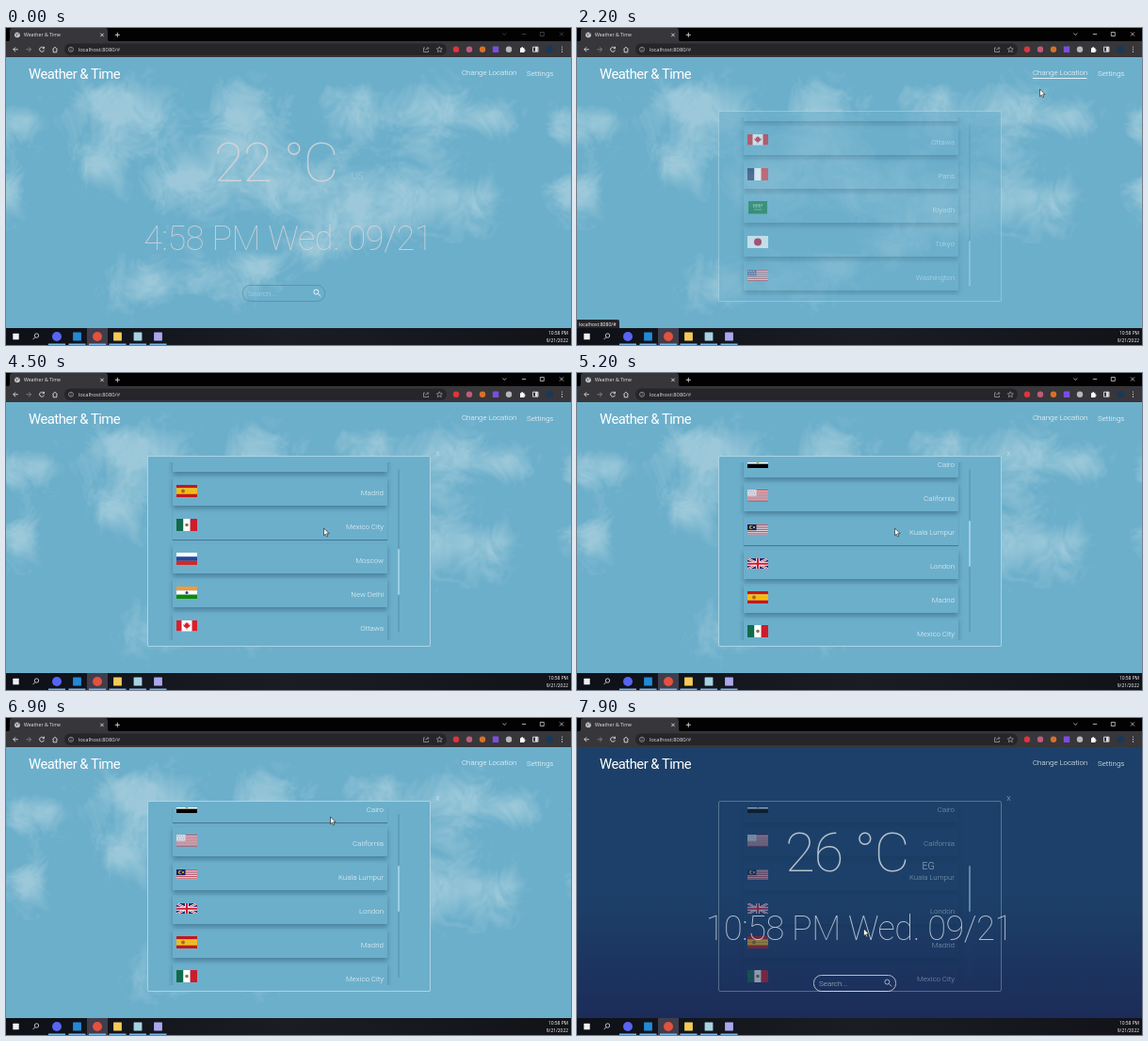
An HTML page with a canvas that plays this animation: 600x337 px, repeating every 8 s.

```html
<!DOCTYPE html>
<html lang="en">
<head>
<meta charset="utf-8">
<title>Weather &amp; Time</title>
<style>
html, body { margin: 0; width: 100%; height: 100%; overflow: hidden; background: #000; }
#stage { position: relative; width: 600px; height: 337px; overflow: hidden; font-family: Roboto, sans-serif; }
#stage > * { position: absolute; left: 0; top: 0; }
#sky { top: 30px !important; background: #6cafcb; }
#night { top: 30px !important; width: 600px; height: 289px; background: linear-gradient(#1c4069 55%, #1c2c59); }
#modal { left: 150px !important; top: 88px !important; width: 299px; height: 201px; border: 1px solid rgba(185,222,236,.8); border-radius: 2px; }
#list { position: absolute; left: 16px; top: 6px; width: 252px; height: 189px; overflow: hidden; }
.row { position: absolute; left: 10px; width: 228px; height: 31px; box-shadow: 0 3px 5px rgba(10,45,70,.36); font-weight: 300; font-size: 7.9px; color: #eef7fa; }
.row.hover { box-shadow: 0 1px 1px rgba(10,45,70,.4); }
.row svg { position: absolute; left: 4px; top: 8px; }
.row span { position: absolute; right: 4px; top: 13px; line-height: 10px; }
#track, #thumb { position: absolute; left: 265px; width: 2px; border-radius: 1px; }
#track { top: 13px; height: 174px; background: rgba(30,90,120,.16); }
#thumb { height: 49px; background: #9bcfe3; }
svg text { white-space: pre; }
.thin { font-weight: 100; }
.light { font-weight: 300; }
.ui { font-family: "Open Sans", sans-serif; }
</style>
</head>
<body>
<div id="stage">
  <canvas id="sky" width="600" height="289"></canvas>
  <div id="night"></div>
  <div id="modal"><div id="list"></div><div id="track"></div><div id="thumb"></div></div>

  <svg id="page" width="600" height="337" fill="#fff">
    <g id="main">
      <text id="temp" class="thin" x="286.500" y="163" font-size="58" letter-spacing="-1.200" text-anchor="middle"></text>
      <text id="code" class="light" x="373" y="161" font-size="10.5" text-anchor="middle"></text>
      <text id="time" class="thin" x="299.700" y="236" font-size="36" letter-spacing="-.4" text-anchor="middle"></text>
      <rect id="box" x="251.5" y="273.5" width="87" height="17" rx="8" fill="none"/>
      <text id="hint" class="light" x="257" y="284.7" font-size="8">Search...</text>
      <g fill="none" stroke="#fff" stroke-width=".9"><circle cx="329.4" cy="280.6" r="2.5"/><path d="M331.2 282.4l3 3"/></g>
    </g>
    <g id="head">
      <text x="24" y="53.5" font-size="14.8" letter-spacing="-.5">Weather &amp; Time</text>
      <text class="light" x="484" y="50.3" font-size="7.9">Change Location</text>
      <text class="light" x="553" y="50.8" font-size="7.9">Settings</text>
      <path id="line" d="M484 53.5h57.5" stroke="#fff" stroke-width=".8"/>
    </g>
    <text id="close" class="light" x="458.5" y="88" font-size="9" text-anchor="middle">x</text>
  </svg>

  <svg id="chrome" width="600" height="337" class="ui" fill="#fff">
    <rect width="600" height="14" fill="#020203"/>
    <path d="M1 14.5q3 0 3-3V3q0-3 3-3h98q3 0 3 3v8.500q0 3 3 3z" fill="#37363a"/>
    <rect y="14" width="600" height="17" fill="#37363a"/>
    <rect x="62" y="16.500" width="406" height="12.500" rx="6.200" fill="#26262a"/>
    <circle cx="12" cy="7.300" r="2.900" fill="#c5c8cc"/>
    <path d="M10 6l2 1-1 2M13 5l1 2" stroke="#45464a" stroke-width=".7" fill="none"/>
    <text x="19" y="9.300" font-size="5.200" fill="#e6e6e8">Weather &amp; Time</text>
    <g fill="none" stroke="#dcdde0" stroke-width=".9">
      <path d="M100.300 5.700l3.400 3.400m0-3.400l-3.400 3.400M115.800 7.300h5m-2.500-2.500v5"/>
      <path d="M12.800 22.800h-5m2.300-2.400l-2.400 2.400 2.400 2.400M49.300 22.800l2.700-2.500 2.700 2.500M50.200 22.500v3.300h3.600v-3.300"/>
      <path d="M21.500 22.800h5m-2.300-2.400l2.400 2.400-2.400 2.400" stroke="#85868a"/>
      <path d="M40.200 21.300a2.500 2.500 0 1 0 .3 2.300M40.500 19.800v2h-2"/>
      <g stroke-width=".7" stroke="#a9abb0">
        <circle cx="69" cy="22.800" r="2.500"/><path d="M69 22.500v1.700m0-3v.6"/>
        <path d="M445 21h-1.500v4.500h5V24M445.500 23.500q.5-2 3-2m-1-1.500l1.300 1.500-1.300 1.500"/>
        <path d="M460.300 19.800l.9 2 2.100.2-1.600 1.500.5 2.100-1.900-1.100-1.900 1.100.5-2.100-1.600-1.500 2.100-.2z"/>
      </g>
      <path d="M559.500 20.200h5.500v5h-5.500z"/><path d="M563.300 20v5" stroke-width="2.600"/>
      <g id="win" stroke-width=".7"><path d="M527.300 5.500l2 2 2-2M547.800 6.500h4.400M567.300 4.500h4v4h-4zM588 4.500l4 4m0-4l-4 4"/></g>
    </g>
    <text x="76.700" y="24.900" font-size="5.750" fill="#e1e2e5">localhost:8080/<tspan fill="#a9abb0">#</tspan></text>
    <g id="exts"></g>
    <path d="M546 21.300h1.300q.2-1.700 1.400-1 .4.300.2 1h1.600v1.600q1.500 0 1 1.300-.3.500-1 .3v1.500h-4.500z"/>
    <path d="M590.500 20v.1m0 2.500v.1m0 2.500v.1" stroke="#dcdde0" stroke-width="1.200" stroke-linecap="round"/>

    <g id="status"><path d="M0 310h43q2 0 2 2v7H0z" fill="#24242a"/><text x="2" y="316.700" font-size="5.100">localhost:8080/#</text></g>

    <linearGradient id="bar"><stop stop-color="#0d1017"/><stop offset=".5" stop-color="#1b1d25"/><stop offset="1" stop-color="#111319"/></linearGradient>
    <rect y="319" width="600" height="18" fill="url(#bar)"/>
    <rect x="86" y="319" width="22" height="18" fill="#403d4c"/>
    <g id="apps"></g>
    <g fill="none" stroke="#e8e8ee" stroke-width=".8"><circle cx="32.500" cy="327" r="2.200"/><path d="M30.900 328.700l-2.300 2.400"/></g>
    <g text-anchor="end" font-size="4.900"><text x="597" y="326">10:58 PM</text><text x="597" y="334.300">9/21/2022</text></g>
  </svg>

  <svg id="pointer" width="14" height="16" viewBox="-2 -2 14 16" stroke="#111" stroke-width=".6" fill="#fff">
    <path id="arrow" d="M0 0v7.800l1.800-1.600 1.200 2.800 1.300-.6-1.200-2.700h2.500z"/>
    <path id="hand" d="M-.8.200q.8-.9 1.500 0v3.300l3 .7q.8.300.7 1.200l-.6 3.300-.7 1H-.2l-2.600-3.500q0-1.100 1-.7l1 .8z"/>
  </svg>
</div>

<script>
const LOOP = 8000;
const $ = id => document.getElementById(id);
const clamp = v => Math.max(0, Math.min(1, v));
const smooth = v => v * v * (3 - 2 * v);

// Reads a table of [time, values...] with eased steps.
function at(table, t) {
  if (t <= table[0][0]) return table[0].slice(1);
  for (let i = 1; i < table.length; i++) {
    const a = table[i - 1], b = table[i];
    if (t < b[0]) {
      const k = smooth((t - a[0]) / (b[0] - a[0]));
      return a.slice(1).map((v, j) => v + (b[j + 1] - v) * k);
    }
  }
  return table[table.length - 1].slice(1);
}

// Small toolbar and taskbar marks
const mark = (x, y, r, color, round) => round
  ? `<circle cx="${x}" cy="${y}" r="${r}" fill="${color}"/>`
  : `<rect x="${x - r}" y="${y - r}" width="${2 * r}" height="${2 * r}" rx=".5" fill="${color}"/>`;
$('exts').innerHTML = [['#e0343c', 1], ['#c05a78', 1], ['#d8702a', 1], ['#7a4ee0', 0], ['#b4b6ba', 1]]
  .map(([c, round], i) => mark(478 + i * 14, 22.8, 3.2, c, round)).join('') + mark(577, 22.8, 3.8, '#183a58', 1);
$('apps').innerHTML = mark(10.5, 328, 3.2, '#f0f0f4', 0) +
  [['#5865f2', 1], ['#2389d7', 0], ['#e2523f', 1], ['#f4cb58', 0], ['#a6d3e2', 0], ['#a9a8f0', 0]]
    .map(([c, round], i) => {
      const x = 54 + i * 21.5;
      return mark(x, 328, round ? 5 : 4.4, c, round) + `<rect x="${x - 9}" y="335.500" width="18" height="1.500" fill="#76b9ed"/>`;
    }).join('');

// Flags are 22 units wide
const rect = (x, y, w, h, c) => `<rect x="${x}" y="${y}" width="${w}" height="${h}" fill="${c}"/>`;
const disc = (x, y, r, c) => `<circle cx="${x}" cy="${y}" r="${r}" fill="${c}"/>`;
const bands = (h, cs) => cs.map((c, i) => rect(0, i * h / cs.length, 22, h / cs.length, c)).join('');
const bars = (h, cs) => cs.map((c, i) => rect(i * 22 / cs.length, 0, 22 / cs.length, h, c)).join('');
const stripes = (h, canton) => bands(h, Array.from({ length: 13 }, (_, i) => i % 2 ? '#f2eef0' : '#c83848')) + rect(0, 0, 9.5, h * 7 / 13, canton);
const stars = c => [1.5, 4, 6.5].map(x => disc(x, 1.6, .5, c) + disc(x + 1, 4, .5, c)).join('');
const cross = (w, c) => `<path d="M0 0L22 11.500M22 0L0 11.500" stroke="${c}" stroke-width="${w}"/>`;
const plus = (w, c) => `<path d="M11 0v11.500M0 5.750h22" stroke="${c}" stroke-width="${w}"/>`;
const cities = [
  ['Cairo', 13, bands(13, ['#ce1126', '#fff', '#000']) + disc(11, 6.5, 1.5, '#c09300')],
  ['California', 12.5, stripes(12.5, '#d5d9e3') + stars('#8793b3')],
  ['Kuala Lumpur', 11.5, stripes(11.5, '#14205e') + disc(4, 3, 2, '#f2c81c') + disc(4.8, 3, 1.6, '#14205e') + disc(7, 3, 1, '#f2c81c')],
  ['London', 11.5, rect(0, 0, 22, 11.5, '#1c2f72') + cross(2.4, '#fff') + cross(.8, '#cf1b34') + plus(3.8, '#fff') + plus(2.2, '#cf1b34')],
  ['Madrid', 13, bands(13, ['#c3181e', '#fabd10', '#fabd10', '#c3181e']) + disc(7, 6.5, 1.9, '#a8642a')],
  ['Mexico City', 13, bars(13, ['#126b4a', '#fff', '#ce1b2a']) + disc(11, 6.5, 1.8, '#8c7448')],
  ['Moscow', 13, bands(13, ['#fff', '#2446a0', '#cf2b25'])],
  ['New Delhi', 13, bands(13, ['#f49a36', '#fff', '#138808']) + disc(11, 6.5, 1.5, '#283a8c')],
  ['Ottawa', 11.5, rect(0, 0, 22, 11.5, '#fff') + rect(0, 0, 5.5, 11.5, '#d8202c') + rect(16.5, 0, 5.5, 11.5, '#d8202c') +
    '<path d="M11 1.500l1 2 1.200-.5-.2 2 2-.7-.8 2-2.500 2h-.4v1.700h-.6V8.300h-.4l-2.500-2-.8-2 2 .7-.2-2 1.200.5z" fill="#d8202c"/>'],
  ['Paris', 13, bars(13, ['#1f3268', '#fff', '#d42c3a'])],
  ['Riyadh', 13.5, rect(1, 0, 20, 13.5, '#117843') + '<path d="M6 4.200h10M6 6h9" stroke="#c8e3d4" stroke-width="1.200" stroke-dasharray="1 .5"/><path d="M7 9h8" stroke="#c8e3d4" stroke-width=".6"/>'],
  ['Tokyo', 13, rect(0, 0, 22, 13, '#fff') + disc(11, 6.5, 4, '#c8143a')],
  ['Washington', 12, stripes(12, '#5a6893') + stars('#fff')]
];
const rows = cities.map(([name, h, art]) => {
  const row = document.createElement('div');
  row.className = 'row';
  row.innerHTML = `<svg width="22" height="${h}" style="top:${15 - h / 2}px">${art}</svg><span>${name}</span>`;
  return $('list').appendChild(row);
});

// Cloud tile: soft ellipses [x, y, rx, ry] broken up by noise, repeating every 600 px
const puffs = [
  [140, 66, 52, 40], [105, 46, 34, 22], [95, 115, 26, 28], [190, 138, 52, 36], [250, 58, 42, 36],
  [254, 108, 48, 36], [305, 140, 48, 34], [381, 58, 36, 32], [450, 56, 46, 38], [514, 66, 38, 22],
  [418, 147, 68, 36], [490, 154, 38, 30], [365, 176, 60, 30], [323, 202, 36, 18],
  [150, 244, 42, 32], [225, 238, 46, 26], [270, 222, 28, 18],
  [590, 73, 18, 26], [617, 70, 32, 24], [599, 142, 22, 30]
];
function hash(x, y, s) {
  let h = Math.imul(x, 374761393) + Math.imul(y, 668265263) + Math.imul(s, 974634541);
  h = Math.imul(h ^ (h >>> 13), 1274126177);
  return ((h ^ (h >>> 16)) >>> 0) / 4294967296;
}
function noise(x, y, cell, s) {
  const n = 600 / cell, u = x / cell, v = y / cell;
  const i = Math.floor(u), j = Math.floor(v), a = smooth(u - i), b = smooth(v - j);
  const p = (di, dj) => hash((i + di + n) % n, j + dj, s);
  const top = p(0, 0) + (p(1, 0) - p(0, 0)) * a, low = p(0, 1) + (p(1, 1) - p(0, 1)) * a;
  return top + (low - top) * b;
}
function cloudTile() {
  const c = document.createElement('canvas');
  c.width = 600; c.height = 289;
  const g = c.getContext('2d'), img = g.createImageData(600, 289);
  for (let y = 0, o = 3; y < 289; y++) for (let x = 0; x < 600; x++, o += 4) {
    let m = 0;
    for (const [px, py, rx, ry] of puffs) {
      const dx = ((x - px + 900) % 600 - 300) / rx, dy = (y - py) / ry, d = dx * dx + dy * dy;
      if (d < 4) m += Math.exp(-d * 1.4);
    }
    if (m < .06) continue;
    // Bend the noise so that the edges turn into wisps
    const u = x + (noise(x, y, 30, 5) - .5) * 28, v = y + (noise(x, y, 30, 6) - .5) * 28;
    const f = noise(u, v, 40, 1) * .3 + noise(u, v, 20, 2) * .28 + noise(u, v, 10, 3) * .22 + noise(u, v, 4, 4) * .2;
    const k = clamp((Math.min(m, 1.1) * .75 + (f - .5) * 1.1 - .16) / .72);
    img.data[o - 3] = 168; img.data[o - 2] = 207; img.data[o - 1] = 221;
    img.data[o] = 205 * k;
  }
  g.putImageData(img, 0, 0);
  return c;
}
const tile = cloudTile(), sky = $('sky').getContext('2d');

const mouse = [[500, 602, 190], [1050, 566, 60], [1350, 509, 51], [1900, 509, 51], [2200, 491.5, 65], [2600, 440, 105],
  [3400, 337.5, 165], [5500, 337.5, 165], [6500, 344.5, 105], [7200, 344.5, 105], [7900, 304.5, 224]];
const wheel = [[3900, 0], [5000, 263.6]];
const modalFade = [[1950, 0], [2400, 1], [7650, 1], [8150, 0]];
const mainFade = [[1850, 1], [2200, 0], [7600, 0], [8000, .8]];
const closeFade = [[2200, 0], [2700, .5]];
const NIGHT = 7650;

function draw(t) {
  const night = t >= NIGHT, shift = t * .0036;
  sky.clearRect(0, 0, 600, 289);
  sky.drawImage(tile, shift, 0);
  sky.drawImage(tile, shift - 600, 0);
  $('night').style.display = night ? '' : 'none';

  const modal = $('modal'), [shown] = at(modalFade, t), [scroll] = at(wheel, t), [mx, my] = at(mouse, t);
  modal.style.opacity = shown;
  modal.style.background = night ? 'none' : '#6cafcb';
  modal.style.borderColor = night ? 'rgba(185,205,225,.75)' : '';
  rows.forEach((row, i) => {
    const y = 104 + 36 * (i - 8) + scroll;
    row.style.top = y - 95 + 'px';
    row.classList.toggle('hover', shown > .5 && mx > 177 && mx < 405 && my > y && my < y + 31);
  });
  $('thumb').style.top = 137 - scroll * 69 / 263.6 + 'px';

  $('main').setAttribute('opacity', at(mainFade, t)[0]);
  $('temp').textContent = night ? '26 °C' : '22 °C';
  $('time').textContent = (night ? '10:58' : '4:58') + ' PM Wed. 09/21';
  $('code').textContent = night ? 'EG' : 'US';
  $('code').setAttribute('opacity', night ? .9 : .25);
  for (const id of ['temp', 'time']) $(id).setAttribute('fill', night ? '#fff' : 'rgba(226,214,218,.8)');
  $('box').setAttribute('stroke', night ? '#fff' : 'rgba(70,122,142,.5)');
  $('hint').setAttribute('opacity', night ? 1 : .45);
  $('close').setAttribute('opacity', at(closeFade, t)[0]);
  $('head').style.filter = t > 2050 && !night ? 'blur(.5px)' : 'none';
  $('line').style.display = t > 1600 && t < 2600 ? '' : 'none';
  $('status').style.display = t > 1600 && t < 2900 ? '' : 'none';
  $('win').setAttribute('stroke', t < 1900 ? '#55565a' : '#e8e8ea');

  const hand = t > 1000 && t < 2000;
  $('hand').style.display = hand ? '' : 'none';
  $('arrow').style.display = hand ? 'none' : '';
  $('pointer').style.transform = `translate(${mx - 2}px, ${my - 2}px)`;
}

const start = performance.now();
function tick() {
  draw((performance.now() - start) % LOOP);
  requestAnimationFrame(tick);
}
tick();
</script>
</body>
</html>
```
